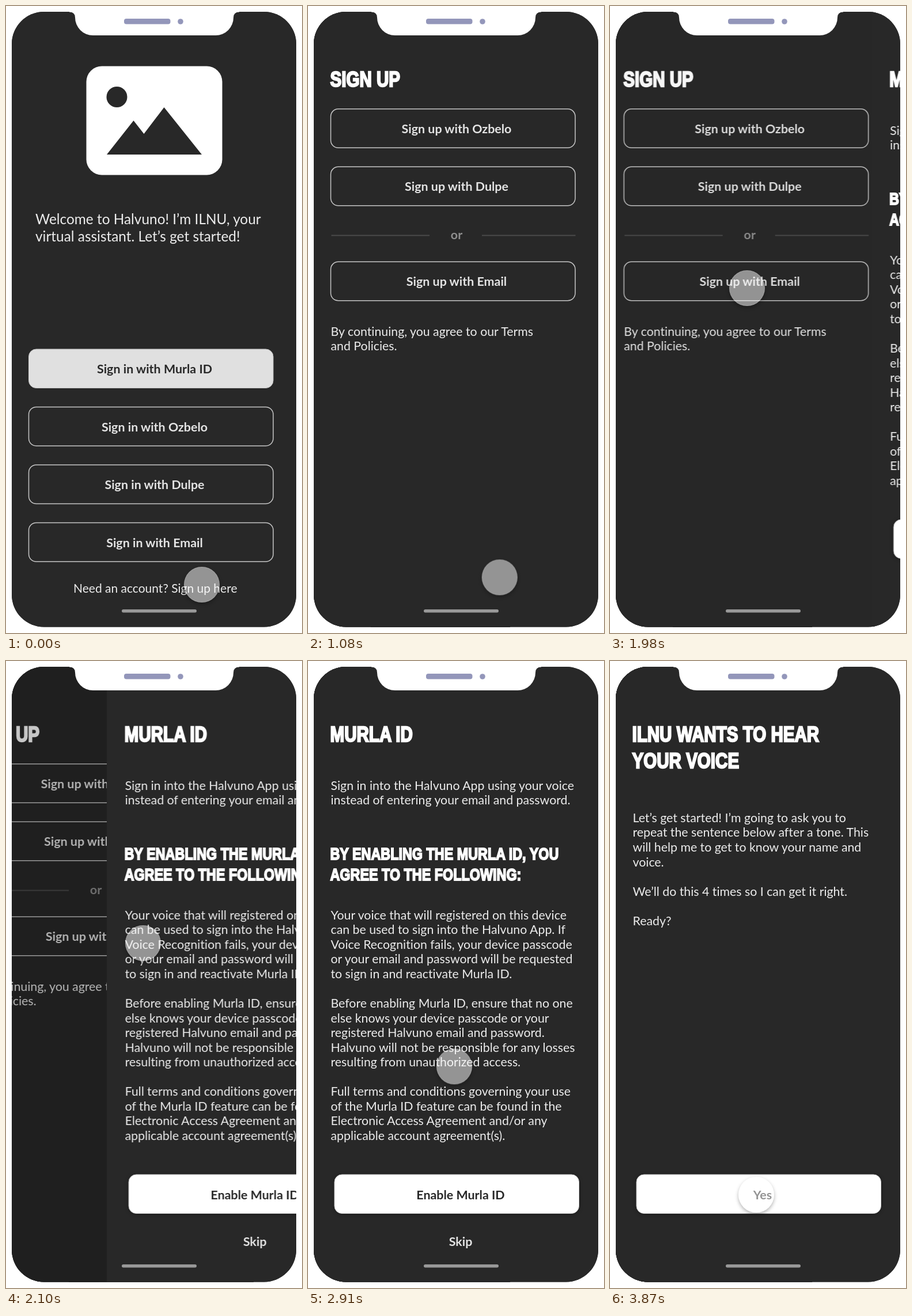
Write an HTML page that moves like this. It is 514 px wide and 1089 px high and loops after 4110 ms.

```html
<!DOCTYPE html>
<html lang="en">
<head>
<meta charset="utf-8">
<title>Sign up flow</title>
<style>
  html, body { margin: 0; width: 100%; height: 100%; overflow: hidden; background: #fff; }
  svg { position: absolute; left: 0; top: 0; display: block; }
  text { font-family: Lato, sans-serif; font-size: 21.43px; font-variant-ligatures: none; fill: #ececec; }
  .bold { font-weight: 700; text-anchor: middle; fill: #e4e4e4; }
  .dark { fill: #282828; }
  .head { font-family: "Liberation Sans", Arial, sans-serif; font-weight: 700; fill: #fff; stroke: #fff; stroke-linejoin: miter; }
  .outline { fill: none; stroke: #c6c6c6; stroke-width: 1.5; }
  .solid { fill: #fff; stroke: #d4d4d4; filter: drop-shadow(0 1px 3px rgba(0, 0, 0, .35)); }
  #cursor {
    position: absolute; left: -31px; top: -31px; width: 62px; height: 62px;
    box-sizing: border-box; border-radius: 50%;
    background: rgba(255, 255, 255, .5); border: 1px solid rgba(255, 255, 255, .14);
    box-shadow: 0 3px 6px rgba(0, 0, 0, .3);
  }
</style>
</head>
<body>
<svg width="514" height="1089" viewBox="0 0 514 1089">
  <defs>
    <clipPath id="phone"><rect x="10" y="10" width="494" height="1068.5" rx="56"/></clipPath>
  </defs>
  <g clip-path="url(#phone)">
    <rect width="514" height="1089" fill="#282828"/>
    <g id="screens"></g>
  </g>
  <path fill="#fff" d="M110 9V10.5Q120 10.5 120 20A31 31 0 0 0 151 51H364A31 31 0 0 0 395 20Q395 10.5 405 10.5V9Z"/>
  <rect x="205" y="22" width="80.5" height="9.6" rx="4" fill="#9396ba"/>
  <circle cx="303" cy="27" r="4.8" fill="#9396ba"/>
  <rect x="201" y="1048" width="130" height="5.5" rx="2.75" fill="#999"/>
</svg>
<div id="cursor"></div>
<script>
const LOOP = 4110, WIDTH = 496, PARALLAX = 0.31, DIM = 0.34;
const SINE = 'cubic-bezier(.37,0,.63,1)';

const lines = (x, y, step, rows, size = 21.3) => rows.map((row, i) =>
  row && `<text x="${x}" y="${y + i * step}" style="font-size:${size}px">${row}</text>`).join('');
const bold = (x, y, label, cls = '') => `<text class="bold ${cls}" x="${x}" y="${y}">${label}</text>`;
// Condensed heavy heading face
const head = (y, step, rows, size, weight) => rows.map((row, i) =>
  `<text class="head" transform="translate(38.5 ${y + i * step}) scale(.795 1)" style="font-size:${size}px;stroke-width:${weight}">${row}</text>`).join('');
const title = (...rows) => head(139.9, 46, rows, 37.2, 2.5);
const box = (x, y, attrs) => `<rect x="${x}" y="${y}" width="424.5" height="67.5" rx="13" ${attrs}/>`;
const outline = (y, label) => box(39.5, y, 'class="outline"') + bold(258, y + 42, label);
const solid = label => box(46, 892, 'class="solid"') + bold(265, 934.5, label, 'dark');

const welcome = `
  <rect x="139.5" y="104.5" width="236" height="189" rx="27" fill="#fff"/>
  <circle cx="192.5" cy="158" r="18" class="dark"/>
  <path class="dark" d="M175 258L221.500 199L239.500 222L274.500 176L340 258Z"/>
  ${lines(51, 379, 30, ['Welcome to Halvuno! I’m ILNU, your', 'virtual assistant. Let’s get started!'], 24.4)}
  ${box(39.5, 596, 'fill="#e0e0e0" stroke="#c6c6c6"')}
  ${bold(258, 638, 'Sign in with Murla ID', 'dark')}
  ${outline(696.5, 'Sign in with Ozbelo')}
  ${outline(797, 'Sign in with Dulpe')}
  ${outline(897.5, 'Sign in with Email')}
  ${lines(117, 1019, 0, ['Need an account? Sign up here'], 21)}`;

const signUp = `
  ${title('SIGN UP')}
  ${outline(178.8, 'Sign up with Ozbelo')}
  ${outline(279.3, 'Sign up with Dulpe')}
  <path d="M40.500 398.500H211M302 398.500H464.500" stroke="#4b4b4b" stroke-width="2"/>
  <g opacity=".55">${bold(258, 405, 'or')}</g>
  ${outline(444.3, 'Sign up with Email')}
  ${lines(39.5, 572.5, 25.6, ['By continuing, you agree to our Terms', 'and Policies.'])}`;

const terms = `
  ${title('MURLA ID')}
  ${lines(39.5, 223.5, 25.6, [
    'Sign in into the Halvuno App using your voice',
    'instead of entering your email and password.'])}
  ${head(344.7, 36.3, ['BY ENABLING THE MURLA ID, YOU', 'AGREE TO THE FOLLOWING:'], 29.4, 2)}
  ${lines(39.5, 448.8, 25.53, [
    'Your voice that will registered on this device',
    'can be used to sign into the Halvuno App. If',
    'Voice Recognition fails, your device passcode',
    'or your email and password will be requested',
    'to sign in and reactivate Murla ID.',
    '',
    'Before enabling Murla ID, ensure that no one',
    'else knows your device passcode or your',
    'registered Halvuno email and password.',
    'Halvuno will not be responsible for any losses',
    'resulting from unauthorized access.',
    '',
    'Full terms and conditions governing your use',
    'of the Murla ID feature can be found in the',
    'Electronic Access Agreement and/or any',
    'applicable account agreement(s).'])}
  ${solid('Enable Murla ID')}
  ${bold(265, 1016, 'Skip')}`;

const voice = `
  ${title('ILNU WANTS TO HEAR', 'YOUR VOICE')}
  ${lines(39.5, 279.7, 25.6, [
    'Let’s get started! I’m going to ask you to',
    'repeat the sentence below after a tone. This',
    'will help me to get to know your name and',
    'voice.',
    '',
    'We’ll do this 4 times so I can get it right.',
    '',
    'Ready?'])}
  ${solid('Yes')}`;

const bg = attrs => `<rect x="8" width="497" height="1089" ${attrs}/>`;
const root = document.getElementById('screens');
root.innerHTML = [welcome, signUp, terms, voice].map(body =>
  `<g>${bg('fill="#282828"')}${body}${bg('class="dim" fill="#000" opacity="0"')}</g>`).join('');

// Steps are [ms, value]; each leg is eased in and out.
function play(el, prop, steps, format = v => v) {
  el.animate(
    steps.map(([t, v]) => ({ offset: t / LOOP, [prop]: format(v), easing: SINE })),
    { duration: LOOP, iterations: Infinity });
}

const pushes = [[270, 660], [1919, 2220], [3502, 3870]];
[...root.children].forEach((screen, i) => {
  const enter = pushes[i - 1], leave = pushes[i];
  const away = -WIDTH * PARALLAX;
  const steps = enter ? [[0, WIDTH], [enter[0], WIDTH], [enter[1], 0]] : [[0, 0]];
  if (leave) {
    steps.push([leave[0], 0], [leave[1], away], [LOOP, away]);
    play(screen.querySelector('.dim'), 'opacity',
      [[0, 0], [leave[0], 0], [leave[1], DIM], [LOOP, DIM]]);
  } else {
    steps.push([LOOP, 0]);
  }
  play(screen, 'transform', steps, x => `translateX(${x}px)`);
});

play(document.getElementById('cursor'), 'transform', [
  [0, [340, 1005]], [120, [336, 1007]], [300, [336, 1007]], [420, [335, 1001]],
  [1060, [335, 1001]], [1380, [118, 171]], [1690, [238, 490]],
  [2380, [238, 490]], [2550, [127, 377]], [2782, [246, 893]],
  [3060, [264, 467]], [3360, [254, 927]], [LOOP, [254, 927]]
], ([x, y]) => `translate(${x}px, ${y}px)`);
</script>
</body>
</html>
```
